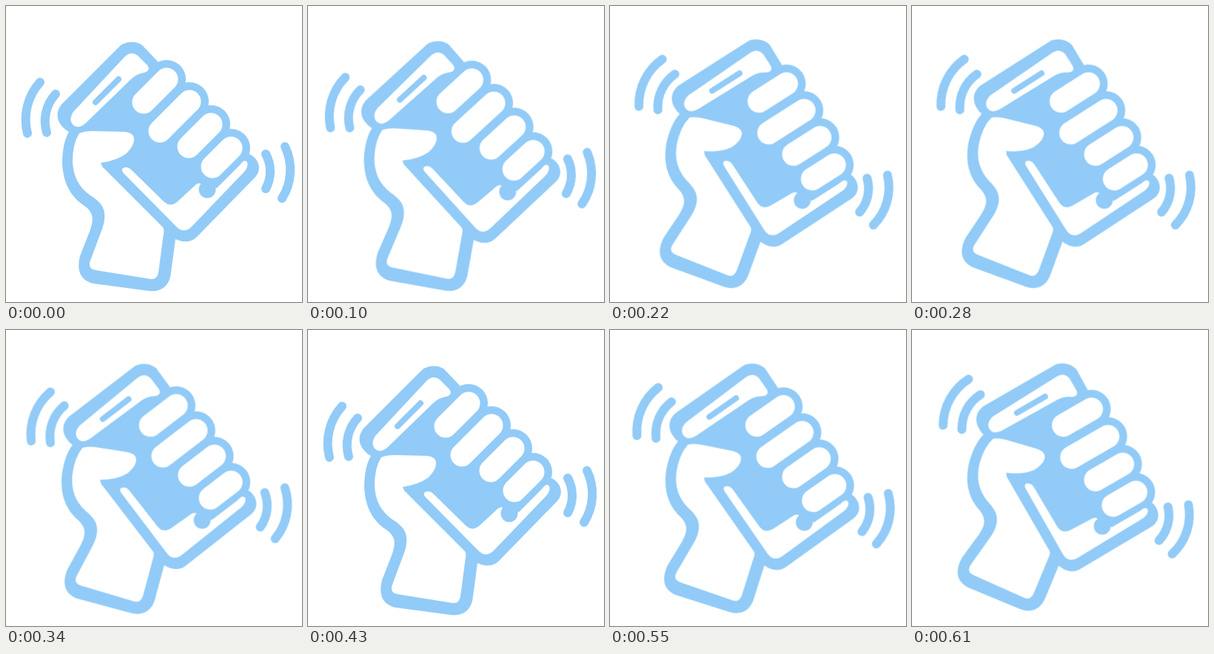
These frames come from a looping animation (400 px wide and 400 px high, 2.91 s). An HTML page:

```html
<!DOCTYPE html>
<html lang="en">
<head>
<meta charset="utf-8">
<title>Shake the phone</title>
<style>
  html, body { margin: 0; width: 100%; height: 100%; overflow: hidden; background: #fff; }
  svg { display: block; width: 100%; height: 100%; }
  .blue { fill: #92cbf7; }
  .white { fill: #fff; }
  .line { fill: none; stroke: #92cbf7; stroke-linecap: round; }
  .waves { stroke-width: 12; }
  .fingers { fill: none; stroke-linecap: round; }
  .rim { stroke: #92cbf7; stroke-width: 52; }
  .skin { stroke: #fff; stroke-width: 31; }

  /* Three swings of six 2.5 degree steps, 30 ms each, then a long rest */
  .shake {
    transform-origin: 200px 200px;
    animation: shake 2910ms infinite;
    animation-timing-function: steps(6, end);
  }
  @keyframes shake {
    0%, 2.405% { transform: rotate(0deg); }
    8.59% { transform: rotate(15deg); }
    14.776% { transform: rotate(0deg); }
    20.962%, 100% { transform: rotate(15deg); }
  }
</style>
</head>
<body>
<svg viewBox="0 0 400 400">
  <defs>
    <path id="fingers" d="M186 130 217 99M208 169 248 129M247 190 277 160M279 217 304 192"/>
  </defs>
  <g class="shake">
    <g class="line waves">
      <path d="M46 103A75 75 0 0 0 29 172"/>
      <path d="M67 119A54 54 0 0 0 55 171"/>
      <path d="M351 200A49 49 0 0 1 351 247"/>
      <path d="M377 190A72 72 0 0 1 373 260"/>
    </g>

    <!-- phone and arm silhouette -->
    <path class="blue" d="M154 54C161 48 178 46 186 55L205 75 217 99 304 192 331 201C342 208 346 221 337 231
      L258 312Q247 323 229 315L223 360C221 380 208 387 193 385L118 375C101 371 95 358 100 338
      L114 302C119 287 118 279 106 270C86 257 77 237 76 212C76 195 79 180 85 170C71 162 64 147 75 133Z"/>
    <use href="#fingers" class="fingers rim"/>

    <!-- top bezel with speaker -->
    <path class="white" d="M160 69Q169 60 178 67L191 80Q196 87 187 90Q178 91 170 98L108 158
      Q98 167 91 161Q84 154 91 143Z"/>
    <path class="line" stroke-width="8" d="M121 130 152 99"/>

    <!-- bottom bezel with button -->
    <path class="white" d="M158 219Q164 216 169 221L214 265Q222 272 231 265L257 241Q261 238 265 241L285 246
      316 215Q322 206 326 211Q328 217 322 224L252 297Q241 309 230 298L159 226Q155 222 158 219Z"/>
    <circle class="blue" cx="272" cy="248" r="11.5"/>

    <!-- thumb and wrist -->
    <path class="white" d="M99 172Q106 169 116 169L160 170Q173 171 173 180Q173 189 163 199Q150 209 128 212
      L130 217 212 299Q214 302 213 307L206 360Q204 370 196 369L121 357Q110 355 114 344L130 301
      Q137 281 129 269Q124 262 114 256Q91 240 90 210Q90 186 99 172Z"/>
    <use href="#fingers" class="fingers skin"/>
  </g>
</svg>
</body>
</html>
```
